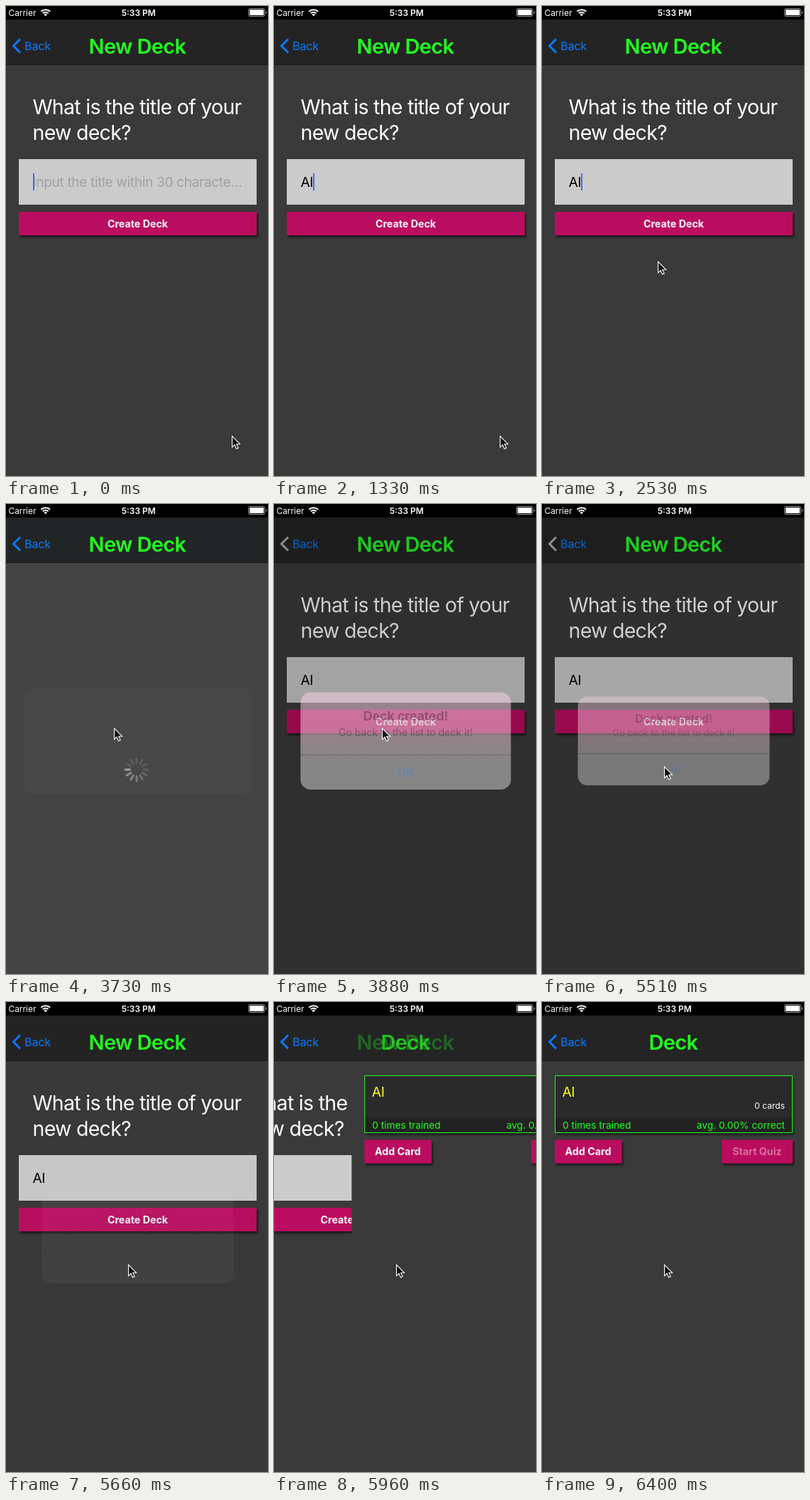
Write an HTML page that moves like this. It is 369 px wide and 660 px high and loops after 8000 ms.

```html
<!DOCTYPE html>
<html lang="en">
<head>
<meta charset="utf-8">
<title>New deck</title>
<style>
html, body { margin: 0; width: 100%; height: 100%; overflow: hidden; background: #3a3a3a; }
svg { display: block; width: 100%; height: 100%; }
text { font-family: Inter, Roboto, sans-serif; font-optical-sizing: none; fill: #fff; white-space: pre; }
.mid { text-anchor: middle; }
.end { text-anchor: end; }
.status { font-size: 11.9px; }
.semi { font-weight: 600; }
.title { font-size: 29px; font-weight: 600; letter-spacing: -.022em; fill: #22ff22; }
.back { font-size: 16.2px; letter-spacing: -.012em; fill: #087aff; }
.question { font-size: 28.5px; letter-spacing: -.025em; }
.field { font-size: 19.2px; letter-spacing: -.02em; }
.button { font-size: 14.2px; font-weight: 700; letter-spacing: .002em; }
.stats { font-size: 13.7px; fill: #22ff22; }
.pink { fill: #bb0c5f; filter: url(#drop); }
#alertText text { fill: #000; }
#alertText .ok { fill: #087aff; }
</style>
</head>
<body>
<svg viewBox="0 0 369 660">
  <defs>
    <filter id="drop" x="-5%" y="-20%" width="112%" height="160%">
      <feDropShadow dx="2" dy="3" stdDeviation="1.5" flood-color="#000" flood-opacity=".55"/>
    </filter>
    <linearGradient id="glass" x1="0" y1="0" x2="0" y2="1">
      <stop offset="0" stop-color="#efd0de"/>
      <stop offset=".26" stop-color="#f8c6df"/>
      <stop offset=".42" stop-color="#f1cadc"/>
      <stop offset=".62" stop-color="#d9d0d4"/>
      <stop offset=".7" stop-color="#d2d1d2"/>
      <stop offset="1" stop-color="#d2d1d2"/>
    </linearGradient>
    <clipPath id="round"><rect x="50.5" y="270.5" width="270" height="124.5" rx="13"/></clipPath>
  </defs>

  <g id="form">
    <rect width="369" height="660" fill="#3a3a3a"/>
    <text class="question" x="37.5" y="152">What is the title of your</text>
    <text class="question" x="37.5" y="187.5">new deck?</text>
    <rect x="18" y="215" width="335" height="64" fill="#cbcbcb"/>
    <text class="field" x="37.5" y="254" id="entry"></text>
    <rect id="caret" y="235" width="2" height="24"/>
    <g id="create">
      <rect class="pink" x="18" y="289" width="335" height="33"/>
      <text class="button mid" x="185.5" y="310.7">Create Deck</text>
    </g>
  </g>

  <g id="loading">
    <rect y="82" width="369" height="578" fill="#444"/>
    <g id="spinner" transform="translate(184 373)" stroke="#b0b0b0" stroke-width="3" stroke-linecap="round"/>
  </g>

  <g id="deck">
    <rect width="369" height="660" fill="#3a3a3a"/>
    <rect x="18.5" y="103.5" width="334" height="80" fill="#2a2a2a" filter="url(#drop)"/>
    <rect x="19" y="162" width="333" height="21" fill="#222"/>
    <rect x="18.5" y="103.5" width="334" height="80" fill="none" stroke="#22ff22"/>
    <text class="field" x="28.5" y="133" style="fill:#ffff22">AI</text>
    <text class="end" x="342" y="150" font-size="12">0 cards</text>
    <text class="stats" x="29" y="177.7">0 times trained</text>
    <text class="stats end" x="342" y="177.7">avg. 0.00% correct</text>
    <rect class="pink" x="18" y="193.5" width="94.5" height="33"/>
    <text class="button mid" x="65" y="215">Add Card</text>
    <rect class="pink" x="253" y="193.5" width="100" height="33"/>
    <text class="button mid" x="303" y="215" opacity=".4">Start Quiz</text>
  </g>

  <rect id="nav" y="19" width="369" height="63"/>
  <rect y="82" width="369" height="1" fill="#1c1c1c"/>
  <path id="chevron" d="M20 46.5 10.5 56l9.5 9.5" fill="none" stroke-width="3"/>
  <text class="back" x="26" y="62">Back</text>
  <text class="title mid" x="185" y="66.7" id="formTitle">New Deck</text>
  <text class="title mid" x="185" y="66.7" id="deckTitle">Deck</text>

  <rect id="dim" width="369" height="660" fill="#000"/>

  <rect width="369" height="19" fill="#000"/>
  <text class="status" x="3.5" y="13.5">Carrier</text>
  <g fill="none" stroke="#fff" stroke-width="2">
    <path d="M49.3 7.8a9 9 0 0 1 12.8 0M51.8 10.3a5.5 5.5 0 0 1 7.8 0"/>
    <path d="M55.7 14.3 53.4 11.9a3.3 3.3 0 0 1 4.6 0Z" fill="#fff" stroke="none"/>
  </g>
  <text class="status semi mid" x="186.7" y="13.5">5:33 PM</text>
  <rect x="341.5" y="3.5" width="23" height="11" rx="2.5" fill="none" stroke="#999"/>
  <rect x="343" y="5" width="20" height="8" rx="1" fill="#fff"/>
  <path d="M366 7.2v3.6q1.6-.4 1.6-1.8t-1.6-1.8" fill="#999"/>

  <g id="alert">
    <g id="card" clip-path="url(#round)">
      <rect x="50" y="270" width="271" height="126" fill="url(#glass)"/>
      <rect id="pressed" x="50" y="351" width="271" height="45" fill="#bbb"/>
      <rect x="50" y="350" width="271" height="1" fill="#a3959c"/>
    </g>
    <g class="mid" id="alertText">
      <text class="semi" x="185.5" y="306.5" font-size="16.2">Deck created!</text>
      <text x="185.5" y="326.3" font-size="12.8">Go back to the list to deck it!</text>
      <text class="ok" x="185.5" y="379" font-size="16.2">OK</text>
    </g>
  </g>

  <path id="pointer" d="M0 0V15.6L3.5 12.3 5.9 17.8 8.6 16.6 6.2 11.2H11Z" fill="#111" stroke="#fff" stroke-width="1.1"/>
</svg>
<script>
const LOOP = 8000, TICK = 148.9;
const el = {};
document.querySelectorAll('[id]').forEach(node => el[node.id] = node);

const spokes = Array.from({ length: 12 }, (_, i) => {
  const spoke = document.createElementNS('http://www.w3.org/2000/svg', 'path');
  spoke.setAttribute('d', 'M0-9.5V-16');
  spoke.setAttribute('transform', `rotate(${i * 30})`);
  el.spinner.append(spoke);
  return spoke;
});

// [tick, x, y]: the pointer jumps at each tick
const pointerPath = [
  [0, 318.5, 604], [14, 304, 582], [15, 258, 508], [16, 200, 418], [17, 163.5, 359],
  [18, 153.5, 322], [19, 152.5, 315], [31, 155, 322], [32, 163, 342], [33, 170, 362], [34, 172.5, 369]
];
// [tick, opacity]
const caretBlink = [[0, 1], [1, 0], [4, 1], [7, 0], [8, 1], [13, 0], [16, 1], [20, .4], [21, 0], [31, 1], [34, 0]];

const latest = (track, n) => track.filter(([tick]) => tick <= n).pop();
const between = (n, from, to) => n >= from && n < to;
const easeOut = u => 1 - (1 - Math.min(1, Math.max(0, u))) ** 3;
const set = (node, name, value) => node.setAttribute(name, value);
const fade = (node, opacity) => set(node, 'opacity', opacity);

function drawField(n) {
  const typed = n < 8 ? '' : n < 9 ? 'A' : 'AI';
  el.entry.textContent = typed || 'Input the title within 30 characte…';
  el.entry.style.fill = typed ? '#000' : '#a0a0a4';
  set(el.caret, 'x', [38, 51, 55][typed.length]);
  set(el.caret, 'fill', n < 30 ? '#426bf2' : '#777');
  fade(el.caret, latest(caretBlink, n)[1]);
  fade(el.create, n === 23 ? .5 : 1);
}

function drawLoading(n) {
  const busy = between(n, 24, 26);
  fade(el.loading, busy ? 1 : 0);
  set(el.nav, 'fill', busy ? '#222525' : '#242424');
  const head = 9 + (n - 25) * TICK * 12 / 1000;
  spokes.forEach((spoke, i) => {
    const age = (((head - i) % 12) + 12) % 12;
    fade(spoke, Math.max(.2, .8 - age * .1));
  });
}

function drawAlert(n) {
  const shown = easeOut((n - 25) / 5);
  const leaving = n < 37 ? 1 : n === 37 ? .45 : n === 38 ? .05 : 0;
  const scale = 1 + .19 * (1 - shown);
  const opacity = n < 25 ? 0 : Math.min(1, .03 + shown * 1.05) * leaving;
  fade(el.card, opacity);
  fade(el.alertText, opacity ** 2);
  set(el.alert, 'transform', `translate(185.5 333) scale(${scale}) translate(-185.5 -333)`);
  fade(el.dim, .4 * shown * leaving);
  fade(el.pressed, n === 36 ? 1 : 0);
  set(el.chevron, 'stroke', between(n, 26, 38) ? '#b0b0b0' : '#087aff');
}

function drawPush(n) {
  const pushed = easeOut((n - 38.5) / 4.5);
  set(el.form, 'transform', `translate(${-110 * pushed})`);
  set(el.deck, 'transform', `translate(${369 * (1 - pushed)})`);
  fade(el.deck, pushed ? 1 : 0);
  fade(el.formTitle, 1 - pushed);
  fade(el.deckTitle, pushed);
}

function draw(now) {
  const n = Math.floor((now % LOOP + 11) / TICK);
  drawField(n);
  drawLoading(n);
  drawAlert(n);
  drawPush(n);
  const [, x, y] = latest(pointerPath, n);
  set(el.pointer, 'transform', `translate(${x} ${y})`);
}

let start;
function loop(now) {
  start ??= now;
  draw(now - start);
  requestAnimationFrame(loop);
}
draw(0);
requestAnimationFrame(loop);
</script>
</body>
</html>
```
